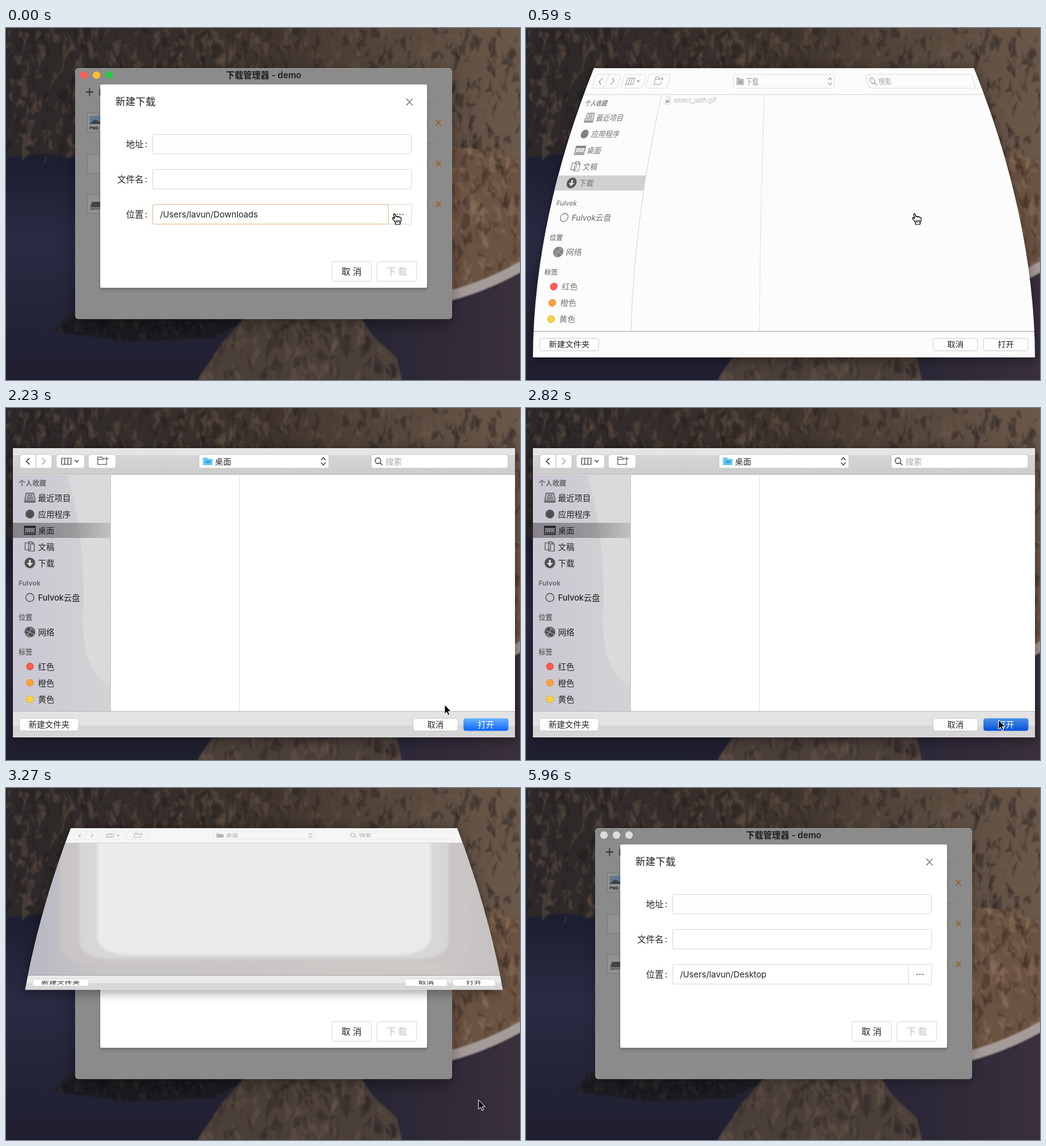
An HTML page that plays this animation: 818x561 px, repeating every 6060 ms.

```html
<!DOCTYPE html>
<html lang="zh">
<head>
<meta charset="utf-8">
<title>下载管理器</title>
<style>
  html, body { margin: 0; width: 100%; height: 100%; overflow: hidden; background: #23243a; }
  svg { display: block; width: 818px; height: 561px; }
  text { font-family: Inter, "Noto Sans CJK SC", "Noto Sans CJK", sans-serif; white-space: pre; }
  #photo { filter: blur(.8px); }
</style>
</head>
<body>
<svg viewBox="0 0 818 561" xmlns="http://www.w3.org/2000/svg">
  <defs>
    <linearGradient id="sea" x2="0" y2="1">
      <stop offset=".36" stop-color="#1b1e30"/><stop offset=".6" stop-color="#2a2b43"/>
      <stop offset="1" stop-color="#1e1e2e"/>
    </linearGradient>
    <linearGradient id="bay"><stop stop-color="#252434"/><stop offset="1" stop-color="#3b303d"/></linearGradient>
    <linearGradient id="hills"><stop stop-color="#2b2729"/><stop offset=".5" stop-color="#3e342d"/>
      <stop offset="1" stop-color="#6d5a4b"/></linearGradient>
    <linearGradient id="side"><stop stop-color="#c9c8d3"/><stop offset="1" stop-color="#d3d2d4"/></linearGradient>
    <linearGradient id="pick"><stop stop-color="#858389"/><stop offset=".6" stop-color="#98979a"/><stop offset="1" stop-color="#c2c2c2"/></linearGradient>
    <linearGradient id="bar" x2="0" y2="1"><stop stop-color="#d6d6d6"/><stop offset="1" stop-color="#cccccc"/></linearGradient>
    <linearGradient id="blue" x2="0" y2="1"><stop stop-color="#6bb1fb"/><stop offset="1" stop-color="#0b68ff"/></linearGradient>
    <linearGradient id="press" x2="0" y2="1"><stop stop-color="#4a92e6"/><stop offset="1" stop-color="#0650d8"/></linearGradient>
    <linearGradient id="glass"><stop stop-color="#b9b9c4"/><stop offset=".15" stop-color="#c6c4c6"/>
      <stop offset=".85" stop-color="#cfc9c6"/><stop offset="1" stop-color="#c4c1c3"/></linearGradient>
    <filter id="soft"><feGaussianBlur stdDeviation="2"/></filter>
  </defs>
  <g id="photo"></g>
  <g id="scene"></g>
</svg>
<script>
const LOOP = 6060, CX = 410.5, TOP = 64, HEIGHT = 461;
const $ = id => document.getElementById(id);
const clamp = v => Math.min(1, Math.max(0, v));

// ---- drawing helpers ----
const rect = (x, y, w, h, fill, extra = '') =>
  `<rect x="${x}" y="${y}" width="${w}" height="${h}" fill="${fill}" ${extra}/>`;
const path = (d, fill = 'none', stroke = 'none', extra = '') =>
  `<path d="${d}" fill="${fill}" stroke="${stroke}" ${extra}/>`;
const line = (d, stroke, width = 1) => path(d, 'none', stroke, `stroke-width="${width}"`);
const dot = (x, y, r, fill, extra = '') => `<circle cx="${x}" cy="${y}" r="${r}" fill="${fill}" ${extra}/>`;
const text = (x, y, str, size, fill, extra = '') =>
  `<text x="${x}" y="${y + size * 0.37}" font-size="${size}" fill="${fill}" ${extra}>${str}</text>`;
const group = (x, y, inner) => `<g transform="translate(${x} ${y})">${inner}</g>`;
const clipped = (id, d, inner) =>
  `<clipPath id="${id}"><path d="${d}"/></clipPath><g clip-path="url(#${id})">${inner}</g>`;
const MID = 'text-anchor="middle"';

// ---- backdrop: a few land masses broken up by seeded shards ----
let seed = 7;
const random = () => (seed = seed * 16807 % 2147483647) / 2147483647;
const spread = size => (random() - 0.5) * size;

function rock(id, outline, fill, [x, y, w, h], tones, size) {
  let shards = '';
  for (let n = w * h / size ** 2 * 2.5; n > 0; n--) {
    const corner = () => `${spread(size).toFixed(1)} ${spread(size * 2).toFixed(1)}`;
    const shape = path(`M${corner()}L${corner()}L${corner()}L${corner()}Z`, tones[n % 2 | 0], 'none', 'opacity=".4"');
    shards += group((x + random() * w).toFixed(1), (y + random() * h).toFixed(1), shape);
  }
  return clipped(id, outline, path(outline, fill) + shards);
}

$('photo').innerHTML = rect(-9, -9, 840, 580, 'url(#sea)') +
  rock('hills', 'M-9-9H830V210H690V100H112V206L60 200-9 208Z', 'url(#hills)', [0, 0, 818, 205], ['#241f1f', '#6b5849'], 18) +
  rock('cliff', 'M700 188L760 194 830 215V370L705 425Z', '#6b5342', [700, 188, 118, 230], ['#33261f', '#8f745d'], 18) +
  path('M540 455L705 430 830 370V570H540Z', 'url(#bay)') +
  line('M705 427Q770 410 830 374', '#a59b98', 16) +
  rock('reef', 'M78 484L100 455H400L330 494 205 500Z', '#1c1b20', [80, 455, 260, 45], ['#121217', '#38302f'], 12) +
  rock('mound', 'M298 570L345 500 385 455H560L585 492 622 525 632 570Z', '#4b3f39', [300, 460, 330, 101], ['#272021', '#6b5a4f'], 24);

// ---- download manager window ----
const cross = (x, y, rx, ry, color, width) =>
  line(`M${x - rx} ${y - ry}l${2 * rx} ${2 * ry}m0 ${-2 * ry}l${-2 * rx} ${2 * ry}`, color, width);
const fileIcon = (y, inner) =>
  group(129, y, path('M.5.5H16L22 7V30.500H.5Z', '#929292', '#777') + inner);

function managerWindow(active, folder, hover) {
  const lights = active ? ['#ff5f57', '#febc2e', '#28c840'] : Array(3).fill('#dcdcdc');
  const shadow = active ? '0 8px 12px rgba(0,0,0,.35)' : '0 4px 8px rgba(0,0,0,.25)';
  const rows = [151, 216, 281].map(y => line(`M138 ${y - 32.5}H682`, '#7a7a7a') +
    cross(688, y, 4, 4.5, '#9b5a1e', 1.4) + rect(668, y - 4, 2.5, 8, '#9b5a1e')).join('');
  const outline = (x, y, w, stroke) => rect(x, y, w, 31, 'none', `rx="2" stroke="${stroke}"`);
  const row = (y, name) => text(219, y, name, 14, '#222', 'text-anchor="end"') +
    text(221, y, ':', 14, '#222') + outline(233.5, y - 15.5, 412, '#d9d9d9');
  const button = (x, name, color) => outline(x + 0.5, 372.5, 63, '#d9d9d9') + text(x + 32, 388, name, 14, color, MID);
  const accent = '#e9b888';
  return rect(110, 64, 600, 400, '#8b8b8b', `rx="5" style="filter:drop-shadow(${shadow})"`) +
    line('M114 64.5H706', '#a2a2a2') +
    lights.map((c, i) => dot(124 + 20 * i, 75, 6, c)).join('') +
    text(410, 75, '下载管理器 - demo', 13.8, '#1c1c1c', MID + ' font-weight="600"') +
    line('M127 102H139M133 96V108M149.500 97V108', '#222', 1.3) + rows +
    fileIcon(135, rect(4, 5, 18, 13, '#62788c') + path('M4 18L12 11 22 15V18Z', '#39424a') +
      text(4, 25, 'PNG', 6.5, '#222', 'font-weight="700"')) +
    fileIcon(201, '') +
    fileIcon(265, path('M8 12H22V21H5Z', '#444') + rect(5, 20, 17, 5, '#6c6c6c')) +
    rect(150, 90, 520, 324, '#fff', 'rx="2" style="filter:drop-shadow(0 3px 2px rgba(0,0,0,.2))"') +
    text(174, 117, '新建下载', 16, '#222', 'font-weight="500"') + cross(642, 118, 5, 5.5, '#777', 1.2) +
    row(185, '地址') + row(241, '文件名') + row(297, '位置') + line('M608.5 282V312', '#d9d9d9') +
    (hover === 'input' ? outline(233.5, 281.5, 375, accent) : '') +
    (hover === 'button' ? outline(608.5, 281.5, 37, accent) : '') +
    [-4.5, 0, 4.5].map(dx => dot(627 + dx, 297, 1, hover === 'button' ? '#c98a4c' : '#444')).join('') +
    text(245, 297, '/Users/lavun/' + folder, 13.4, '#222') +
    button(518, '取 消', '#222') + button(590, '下 载', '#bfbfbf');
}

// ---- folder sheet: rows narrow toward the top while it unrolls ----
function warper(fold, h) {
  const rest = y => Math.max(0, 1 - (y - TOP) / HEIGHT * h);
  const scale = y => 1 - 0.243 * fold * rest(y) ** 1.9;
  const point = (x, y) => [CX + (x - CX) * scale(y), TOP + (y - TOP) * h];
  const edge = (x, y0, y1) => Array.from({ length: 17 }, (_, i) =>
    point(x, y0 + (y1 - y0) * i / 16).map(v => v.toFixed(2)).join(' '));
  return {
    side: (x, y0, y1) => 'M' + edge(x, y0, y1).join('L'),
    across: y => `M${point(11, y)}L${point(810, y)}`,
    area: (x, y, w, hh) => 'M' + [...edge(x, y, y + hh), ...edge(x + w, y + hh, y)].join('L') + 'Z',
    cell(x, y, inner) {
      const slope = 0.243 * fold * 1.9 * rest(y) ** 0.9 * h / HEIGHT;
      const m = [scale(y), 0, (x - CX) * slope, h, ...point(x, y)];
      return `<g transform="matrix(${m.map(v => v.toFixed(4)).join(' ')})">${inner}</g>`;
    },
  };
}

const icons = {
  recent: c => path('M-6-7H6L8 3V7H-8V3Z', 'none', c, 'stroke-width="1.3"') + line('M-4-4H4M-5-1H5M-6 2H6M-7 5H7', c, 1.4),
  apps: c => dot(0, 0, 7, c),
  desktop: c => rect(-8.5, -6.5, 17, 13, '#0002', `stroke="${c}" stroke-width="1.4"`) +
    line('M-8-5H8', c, 2) + path('M-6 4H7', 'none', c, 'stroke-width="2" stroke-dasharray="2 1"'),
  papers: c => path('M-7.500-6H-1L1-4V5H-7.500ZM-2-8H3L7-4V7H-2ZM3-8V-4H7', 'none', c, 'stroke-width="1.2"'),
  down: c => dot(0, 0, 8.5, c) + path('M-1.500-5H1.500V0H5L0 5.500-5 0H-1.500Z', '#ddd'),
  cloud: c => dot(0, 0, 6.5, 'none', `stroke="${c}" stroke-width="1.3"`),
  globe: c => dot(0, 0, 8.5, c) + line('M-7-3L7 4M-5 6L4-7M-8 2L1 8M-2-8L7-2', '#c8c8c8', 0.8),
};
const tag = (fill, edge) => () => dot(0, 0, 5.5, fill, `stroke="${edge}"`);
const sections = [
  [120, '个人收藏', ['最近项目', icons.recent], ['应用程序', icons.apps], ['桌面', icons.desktop],
    ['文稿', icons.papers], ['下载', icons.down]],
  [279, 'Fulvok', ['Fulvok云盘', icons.cloud]],
  [334, '位置', ['网络', icons.globe]],
  [389, '标签', ['红色', tag('#ff5c53', '#e0443c')], ['橙色', tag('#fda13e', '#e58a26')], ['黄色', tag('#f9d043', '#dcb428')]],
];

function sidebar(w, live, place) {
  const item = (y, name, icon) => {
    const picked = name === place;
    const ink = live ? (picked ? '#1e1d24' : '#505052') : (picked ? '#555' : '#808080');
    return (picked ? path(w.area(11, y - 12, 155, 24), live ? 'url(#pick)' : '#d0d0d0') : '') +
      w.cell(38, y, icon(ink) + text(13, 0, name, 13, live ? '#222' : '#777', 'font-weight="500"'));
  };
  return sections.map(([y, heading, ...items]) =>
    w.cell(20, y, text(0, 0, heading, 11, live ? '#666' : '#888', 'font-weight="600"')) +
    items.map(([name, icon], i) => item(y + 23 + 26 * i, name, icon)).join('')).join('');
}

function toolbar(w, live, place, soft) {
  const ink = live ? '#444' : soft ? '#aaa' : '#999';
  const edge = live ? '#bdbdbd' : soft ? '#e2e2e2' : '#d2d2d2';
  const back = live ? (place === '桌面' ? '#333' : '#999') : ink;
  const folder = live ? '#68c6ef' : '#bbb';
  const box = (x, wd, inner) => w.cell(x + wd / 2, 85,
    rect(-wd / 2, -11, wd, 22, live ? '#fff' : 'none', `rx="4" stroke="${edge}" stroke-width=".8"`) + inner);
  return box(22, 51, line('M0-11V11', edge) + line('M-10-5L-15 0-10 5', back, 1.5) + line('M10-5L15 0 10 5', live ? '#aaa' : ink, 1.5)) +
    box(80, 45, line('M-14-5H1V5H-14ZM-9-5V5M-4-5V5', ink, 1.2) + line('M7-2L10 1 13-2', ink, 1.5)) +
    box(131, 44, line('M4-5H0L-1.500-7H-7V5H7V0M-7-3H3M4-4H10M7-7V-1', ink, 1.1)) +
    box(307, 207, group(-89, 0, path('M-8-6H-2L0-4H7V6H-8Z', folder) + rect(-4, -1, 8, 4, live ? '#38a1dc' : '#a5a5a5', 'rx="2"')) +
      text(-78, 0, place, 13, live ? '#333' : ink) + line('M91-2L94.500-6 98-2M91 2L94.500 6 98 2', ink, 1.4)) +
    box(581, 218, dot(-98, -1, 4.5, 'none', `stroke="${ink}" stroke-width="1.3"`) +
      line('M-95 2L-91 6', ink, 1.4) + text(-86, 0, '搜索', 13, '#aaa'));
}

function footer(w, live, pressed) {
  const button = (x, wd, name, fill = '#fff', color = '#222') => w.cell(x + wd / 2, 504.5,
    rect(-wd / 2, -10, wd, 20, fill, `rx="4" stroke="${fill === '#fff' ? '#c4c4c4' : 'none'}" stroke-width=".8"`) +
    text(0, 0, name, 13, color, MID + ' font-weight="500"'));
  const open = live ? [pressed ? 'url(#press)' : 'url(#blue)', '#fff'] : [];
  return button(21.5, 94, '新建文件夹') + button(648, 71, '取消') + button(728, 71.5, '打开', ...open);
}

function frosted(w, h) {
  const fill = (y, ht, c) => path(w.area(11, y, 799, ht), c);
  const layer = (inset, c) => rect(11 + inset, -100, 799 - 2 * inset, 100 + TOP + (420 - inset * 0.44) * h, c,
    `rx="48" ry="${48 * h}" filter="url(#soft)"`);
  return clipped('sheet', w.area(11, 64, 799, 461), fill(106, 378, 'url(#glass)') +
    layer(76, '#cac6c5') + layer(106, '#d7d7d7') + layer(134, '#ebebeb') +
    fill(64, 42, '#f6f6f6') + fill(484, 22, '#eaeaea') + fill(506, 19, '#d7d7d7'));
}

const vibrant = () => rect(11, 64, 799, 11, '#e5e5e5') + rect(11, 75, 799, 31, 'url(#bar)') +
  rect(11, 107, 155, 376, 'url(#side)') + path('M97 107Q128 200 122 340Q124 425 166 442V107Z', '#dadadb') +
  rect(11, 484, 799, 22, '#e3e3e3') + rect(11, 506, 799, 19, '#d5d5d5');

function sheet({ fold, h, look }, place, pressed) {
  const w = warper(fold, h), live = look === 'live', soft = look === 'soft';
  const columns = () => sidebar(w, live, place) + line(w.side(166.5, 107, 483), live ? '#c8c8c8' : '#d5d5d5') +
    line(w.side(371.5, 107, 483), '#e3e3e3') +
    (place === '下载' ? w.cell(181, 115, path('M-4-6H2L5-3V7H-4Z', '#f0f0f2', '#ddd') +
      rect(-3.5, 0, 7, 4, '#aab0c8') + text(12, 0, 'select_path.gif', 12, '#bcbcbc')) : '');
  return path(w.area(11, 64, 799, 461), live ? '#fff' : '#fcfcfc', 'none',
    'style="filter:drop-shadow(0 4px 9px rgba(0,0,0,.4))"') +
    (soft ? frosted(w, h) : live ? vibrant() : '') +
    line(w.across(106), live ? '#b4b4b4' : '#d0d0d0') + line(w.across(483.5), live ? '#bcbcbc' : '#a5a5a5') +
    toolbar(w, live, place, soft) + (soft ? '' : columns()) + footer(w, live, pressed);
}

function sheetAt(t) {
  if (t < 450 || t >= 3570) return null;
  if (t >= 3120) return { fold: 0.95, h: 1 - (t - 3120) / 340, look: 'soft' };
  return { fold: (1 - clamp((t - 590) / 300)) ** 3, h: clamp((t - 310) / 280), look: t < 890 ? 'fresh' : 'live' };
}

// ---- pointer ----
const hand = path('M-3.500 4C-6 0-7 0-7-1C-7-2.500-5-2-3.500-.5L-5-6C-5.500-8.500-3-9-2.500-6.500L-1.500-3C-1-4.500 1-4 1.500-2.500' +
  'C2-4 4-3.500 4.500-2C5.500-3 7-2 7 0C7 4 5 5 5 9H-2C-2 7-2.500 5.500-3.500 4ZM-1 2V6M1.500 2V6M4 2V6',
  '#fff', '#000', 'stroke-width="1.2" stroke-linejoin="round"');
const arrow = path('M0 0V15L3.300 11.800 5.600 17 8 16 5.800 10.900H10.500Z', '#000', '#fff');

const glide = (t, t0, t1, from, to, power) => {
  const left = (1 - clamp((t - t0) / (t1 - t0))) ** power;
  return from.map((v, i) => to[i] + (v - to[i]) * left);
};

function pointer(t) {
  const field = [617, 280], desktop = [70, 191], open = [752, 497];
  if (t >= 4170) return '';
  if (t < 740) return group(622, 304, hand);
  if (t >= 4020) return group(778, 536, arrow);
  const [x, y] = t < 1780 ? glide(t, 590, 1490, field, desktop, 2.7) : glide(t, 1780, 2670, desktop, open, 3.6);
  return group(x, y, arrow);
}

// ---- playback: steady steps, then a few late changes ----
const cuts = [...Array.from({ length: 25 }, (_, n) => 10 * Math.round(14.86 * n)), 4020, 4170, 5960];

function draw(t) {
  const hover = t < 150 ? 'input' : t < 590 ? 'button' : '';
  const panel = sheetAt(t);
  $('scene').innerHTML = managerWindow(t < 5960, t < 3570 ? 'Downloads' : 'Desktop', hover) +
    (panel ? sheet(panel, t < 1780 ? '下载' : '桌面', t >= 2820) : '') + pointer(t);
}

let shown = -1;
const start = performance.now();
function tick() {
  const t = (performance.now() - start) % LOOP;
  const cut = cuts.filter(c => c <= t).pop();
  if (cut !== shown) draw(shown = cut);
  requestAnimationFrame(tick);
}
tick();
</script>
</body>
</html>
```
